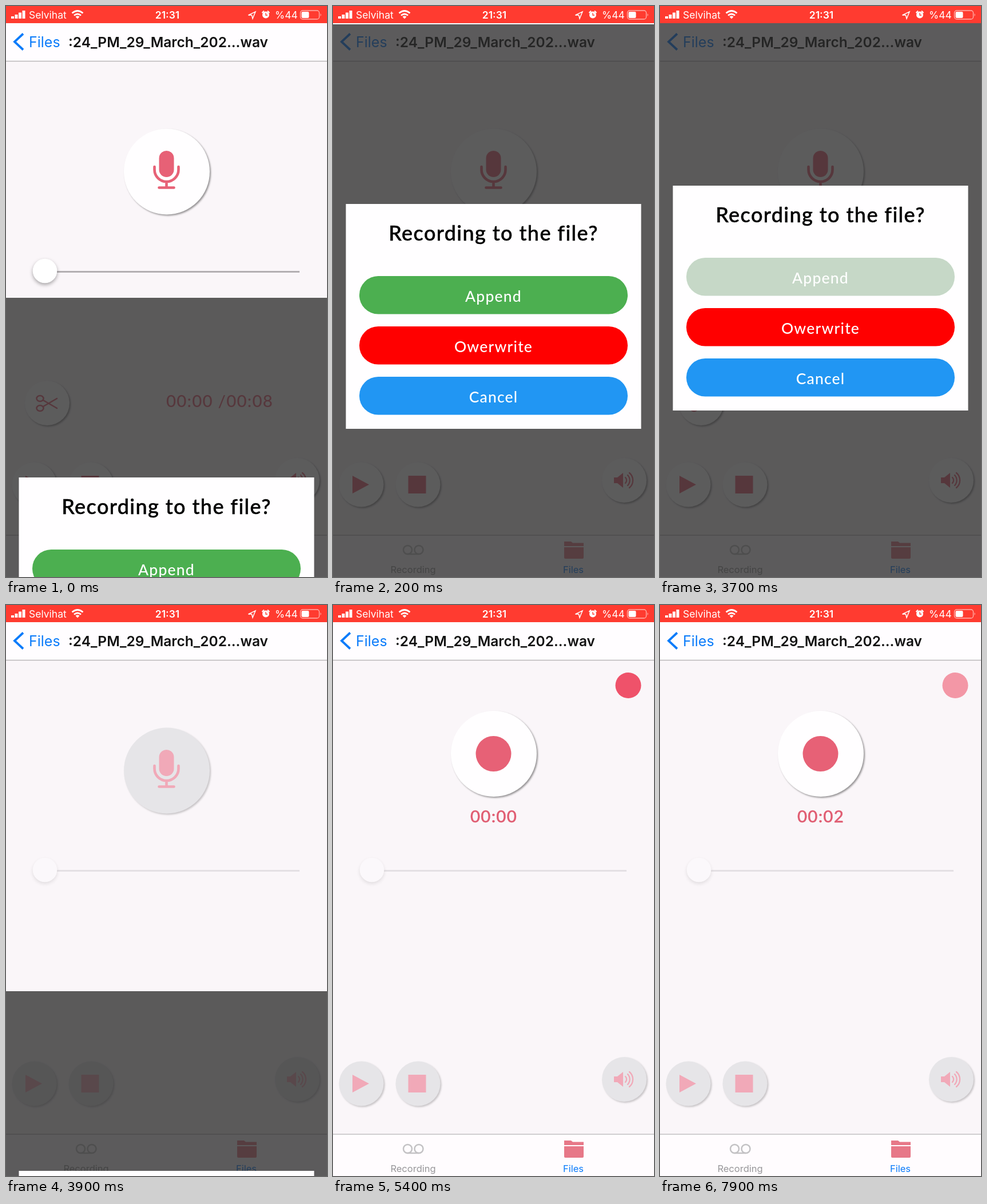
Write an HTML page that moves like this. It is 561 by 998 pixels and loops after 8 s.

```html
<!DOCTYPE html>
<html lang="en">
<head>
<meta charset="utf-8">
<title>Recorder</title>
<style>
  html, body { margin: 0; width: 100%; height: 100%; overflow: hidden; background: #faf6f9; }
  svg { display: block; width: 100vw; height: 100vh; font-family: Inter, Roboto, sans-serif; }
  svg { --face: #fffeff; --icon: #e76176; --shadow: #0006; }
  svg.off { --face: #e6e5e8; --icon: #f1a9b8; --shadow: #0003; }
  .face { fill: var(--face); filter: drop-shadow(2px 2px 1.5px var(--shadow)); }
  .icon { fill: var(--icon); }
  .line { fill: none; stroke: var(--icon); stroke-linecap: round; }
  .off #slider { opacity: .3; }
  .off #edit { display: none; }
  .round { font-family: Lato, "Open Sans", sans-serif; font-weight: 500; letter-spacing: 1.2px; }
  .mid { text-anchor: middle; }
</style>
</head>
<body>
<svg id="stage" viewBox="0 0 561 998" preserveAspectRatio="none">
  <rect width="561" height="998" fill="#faf6f9"/>

  <g id="header">
    <rect y="30" width="561" height="66" fill="#fffdff"/>
    <path d="M0 96.5H561" stroke="#b9b6b9" stroke-width="1.3"/>
    <path d="M30 48.5L15 62.5L30 76.5" fill="none" stroke="#0a7bfa" stroke-width="3.8"/>
    <text x="40" y="72" font-size="25" fill="#0a7bfa">Files</text>
    <text x="109" y="72" font-size="24.5" font-weight="600" fill="#111">:24_PM_29_March_202...wav</text>
  </g>

  <g id="mic">
    <circle class="face" cx="281" cy="289.5" r="75"/>
    <rect class="icon" x="267.5" y="253" width="26" height="46" rx="13"/>
    <path class="line" stroke-width="4.6" d="M259.5 281V286a21 21 0 0 0 42 0V281M280.5 308V317M267.5 317.5H293.5"/>
  </g>

  <g id="recorder">
    <circle class="face" style="--face:#fffeff;--shadow:#0006" cx="281" cy="260" r="75"/>
    <circle cx="280.5" cy="260" r="31" fill="#e76176"/>
    <text id="timer" class="round mid" x="281" y="379.5" font-size="29.5" fill="#e05d72" stroke="#e05d72" stroke-width=".4"></text>
    <circle id="blink" cx="516" cy="140.5" r="22.5" fill="#ef526a"/>
  </g>

  <g id="slider">
    <path d="M68 464.5H513" stroke="#b3afb2" stroke-width="3"/>
    <circle cx="68" cy="463" r="21.3" fill="#fff" style="filter:drop-shadow(0 3px 3px #0005)"/>
  </g>

  <g id="edit">
    <circle class="face" cx="72" cy="694" r="39"/>
    <g class="line" stroke-width="2.5">
      <ellipse cx="59.5" cy="686" rx="6" ry="5"/>
      <ellipse cx="59.5" cy="703" rx="6" ry="5"/>
      <path d="M65 689L89 703M65 700L89 686"/>
    </g>
    <text class="round icon" x="280" y="701" font-size="29.5">00:00 /00:08</text>
  </g>

  <circle class="face" cx="49.5" cy="836.5" r="39"/>
  <path class="icon" d="M34 821L63 836.5L34 852Z"/>
  <circle class="face" cx="148.5" cy="836.5" r="39"/>
  <rect class="icon" x="131.5" y="821" width="31" height="31"/>
  <circle class="face" cx="509" cy="829" r="39"/>
  <path class="icon" d="M491 824H497L507 816V842L497 834H491Z"/>
  <path class="line" stroke-width="2.3" d="M511 824a7 7 0 0 1 0 10M515 820a13 13 0 0 1 0 18M518 816a17 17 0 0 1 0 26"/>

  <g id="tabs">
    <rect y="925" width="561" height="73" fill="#fffcfe"/>
    <path d="M0 925H561" stroke="#c2bfc2" stroke-width="1.5"/>
    <g fill="none" stroke="#c3c2c4" stroke-width="2.5">
      <circle cx="130.5" cy="950.5" r="7.5"/>
      <circle cx="150" cy="950.5" r="7.5"/>
      <path d="M130 958H150"/>
    </g>
    <path d="M404 944V936H416L419 938.5H438V944ZM404 946H438V964q0 2-2 2H406q-2 0-2-2Z" fill="#e77888"/>
    <g class="mid" font-size="16.5">
      <text x="140" y="990.5" fill="#98979a">Recording</text>
      <text x="420" y="990.5" fill="#0a7bfa">Files</text>
    </g>
  </g>

  <g id="sheet">
    <rect width="561" height="998" fill="#2c2b2b" fill-opacity=".77"/>
    <rect x="22.5" y="314" width="516" height="393" fill="#fffeff"/>
    <text class="round mid" x="280.5" y="378" font-size="36" stroke="#000" stroke-width=".5" style="letter-spacing:1.4px">Recording to the file?</text>
    <g class="round mid" font-size="26.5" fill="#fff">
      <rect id="append" x="46" y="440" width="469" height="66.5" rx="33"/>
      <text x="280.5" y="485">Append</text>
      <rect x="46" y="528" width="469" height="66.5" rx="33" fill="#f00"/>
      <text x="280.5" y="573">Owerwrite</text>
      <rect x="46" y="616" width="469" height="66.5" rx="33" fill="#2196f3"/>
      <text x="280.5" y="661">Cancel</text>
    </g>
  </g>

  <g id="status" fill="#fff">
    <rect width="561" height="30" fill="#ff3b30"/>
    <path d="M9 18h5v4h-5zM15.5 15h5v7h-5zM22 11.5h5v10.5h-5zM28.5 8h5v14h-5z"/>
    <text x="40" y="21.5" font-size="17.5">Selvihat</text>
    <g fill="none" stroke="#fff" stroke-width="2.8">
      <path d="M115.5 12.5q9.5-8 19 0M119 16.5q6-5 12 0"/>
    </g>
    <path d="M121.5 18.8q3.5-2.5 7 0L125 22.5Z"/>
    <text class="mid" x="282" y="21.5" font-size="17.5" font-weight="600">21:31</text>
    <path d="M423.5 16L436 10L431 22L429.5 16Z" fill="none" stroke="#fff" stroke-width="1.5"/>
    <circle cx="454" cy="15.5" r="6"/>
    <path d="M447.5 12l3.5-3.5M460.5 12l-3.5-3.5" stroke="#fff" stroke-width="2"/>
    <path d="M454 12V16H457" fill="none" stroke="#ff3b30" stroke-width="1.3"/>
    <text x="470" y="21.5" font-size="17.5">%44</text>
    <rect x="514.5" y="8" width="33" height="15" rx="4" fill="none" stroke="#ffb4ae" stroke-width="1.3"/>
    <rect x="516.5" y="10" width="13" height="11" rx="2"/>
    <path d="M549.5 13q2.5 2.5 0 5z" fill="#ffb4ae"/>
  </g>
</svg>
<script>
const LOOP = 8000, STEP = 100, HEIGHT = 998;
const OPEN = -90, PRESS = 3700, CLOSE = 3772.4, RECORD = 4300, COUNT = 5450;
const el = id => document.getElementById(id);
const show = (id, on) => el(id).style.display = on ? "" : "none";

// Critically damped spring: share of the way still to go after ms.
const remaining = ms => {
  const x = Math.max(0, ms) * 0.01826;
  return (1 + x) * Math.exp(-x);
};

function draw(t) {
  const recording = t >= RECORD;
  const left = t < CLOSE ? remaining(t - OPEN) : 1 - remaining(t - CLOSE);
  el("sheet").setAttribute("transform", `translate(0 ${Math.round(HEIGHT * left)})`);
  show("sheet", !recording);
  el("append").setAttribute("fill", t < PRESS ? "#4caf50" : "#c6d8c7");

  el("stage").classList.toggle("off", t >= CLOSE);
  show("mic", !recording);
  show("recorder", recording);

  const elapsed = Math.max(0, t - COUNT);
  el("timer").textContent = "00:0" + Math.floor(elapsed / 1000);
  el("blink").setAttribute("opacity", 0.5 + 0.5 * Math.cos(Math.PI * elapsed / 1000));
}

function tick() {
  draw(Math.floor(performance.now() % LOOP / STEP) * STEP);
  requestAnimationFrame(tick);
}
tick();
</script>
</body>
</html>
```
